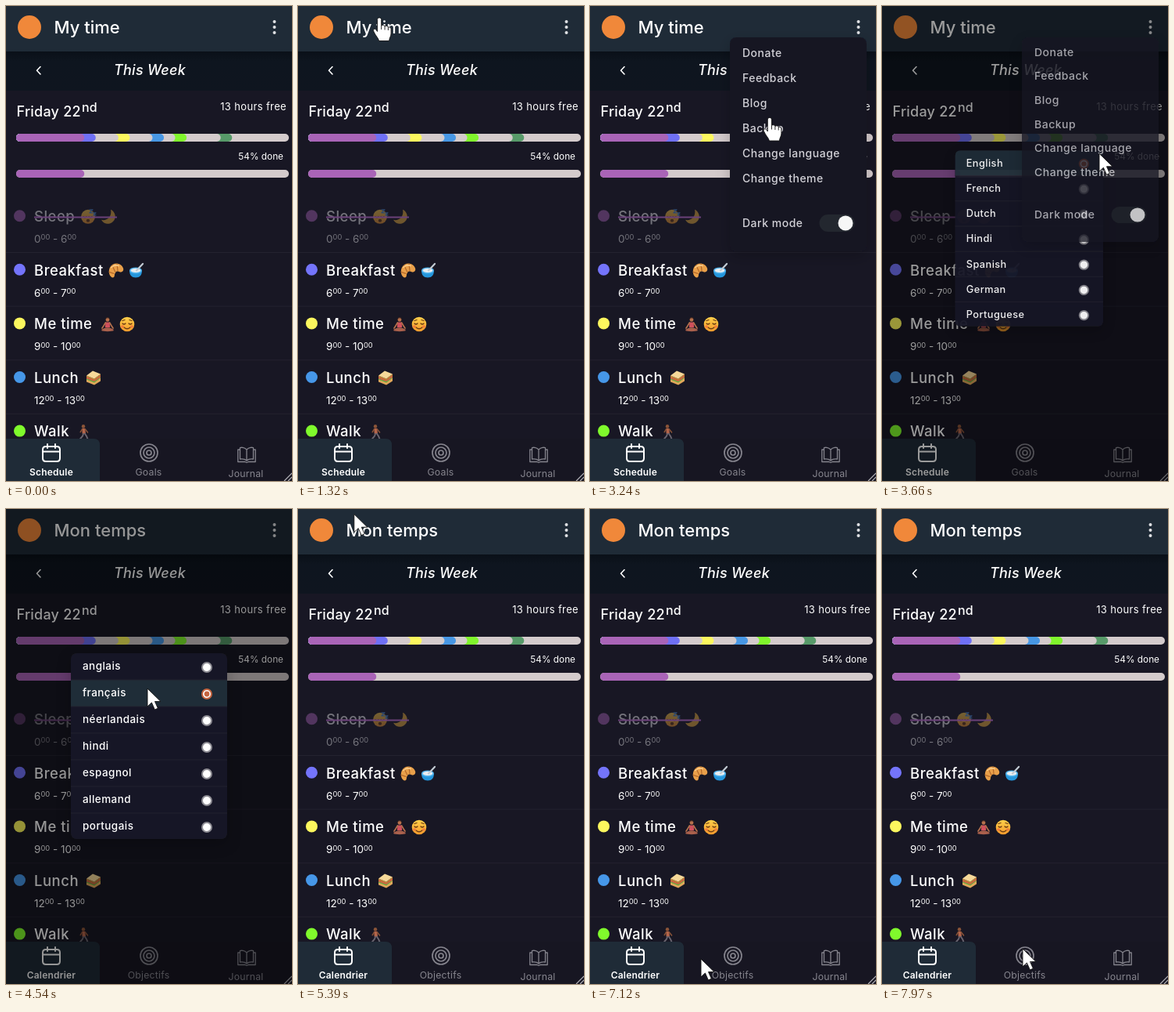
These frames come from a looping animation (366 px wide and 606 px high, 8 s). An HTML page:

```html
<!DOCTYPE html>
<html lang="en">
<head>
<meta charset="utf-8">
<title>My time</title>
<style>
html, body { margin: 0; width: 100%; height: 100%; overflow: hidden; background: #181724; }
svg { display: block; width: 100%; height: 100%; font-family: Inter, "Open Sans", sans-serif; }
text { fill: #fff; }
.name { font-size: 18.5px; font-weight: 500; letter-spacing: .5px; }
.hours { font-size: 13.5px; }
.sup { font-size: 9.3px; }
.tab { font-size: 12.3px; letter-spacing: .2px; text-anchor: middle; }
.tab.on { font-size: 12px; font-weight: 600; }
.off { fill: #85848d; }
.line { fill: none; stroke-linecap: round; stroke-linejoin: round; }
.menu text { font-size: 14px; font-weight: 500; letter-spacing: .5px; fill: #d2d1d7; }
.modal text { font-size: 13.5px; font-weight: 500; letter-spacing: .45px; }
</style>
</head>
<body>
<svg id="stage" viewBox="0 0 366 606" xmlns="http://www.w3.org/2000/svg">
  <defs>
    <filter id="shade" x="-30%" y="-30%" width="160%" height="160%">
      <feDropShadow dx="0" dy="6" stdDeviation="9" flood-color="#000" flood-opacity=".22"/>
    </filter>
    <linearGradient id="sub" x1="0" y1="0" x2="0" y2="1">
      <stop offset="0" stop-color="#0a1018"/><stop offset=".25" stop-color="#0e151f"/><stop offset="1" stop-color="#0f151f"/>
    </linearGradient>
    <linearGradient id="skin" x1="0" y1="0" x2="0" y2="1">
      <stop offset="0" stop-color="#ffd04a"/><stop offset="1" stop-color="#f59a2c"/>
    </linearGradient>
    <clipPath id="round"><rect x="83" y="184" width="200" height="237" rx="7"/></clipPath>

    <g id="doze">
      <circle r="9" fill="url(#skin)"/>
      <path class="line" d="M-6 0q2 2 4 0M1 0q2 2 4 0" stroke="#6b3d14" stroke-width="1.4"/>
      <ellipse cy="5" rx="2.2" ry="2" fill="#6b3d14"/>
      <path class="line" d="M2-9h4l-4 4h4M7-5h3l-3 3h3" stroke="#4a8fe0" stroke-width="1.3"/>
    </g>
    <path id="moon" d="M3-9A9.4 9.4 0 1 1-9 4C-2 6 5 0 3-9Z" fill="#f2b63c"/>
    <g id="croissant">
      <path d="M9-3C6-10-4-11-8-4C-11 2-8 9-4 9C-1 8-3 5-1 3C0 0 3 1 5 2C8 2 10 0 9-3Z" fill="#e9a04a"/>
      <path class="line" d="M1-8L2 0M-5-6L-1 2M-9 2L-3 4" stroke="#b3682a" stroke-width="1.2"/>
      <path class="line" d="M-6-4q4-4 9-2" stroke="#ffd592" stroke-width="1.4"/>
    </g>
    <g id="bowl">
      <path d="M-9 0H7C7 6 4 9-1 9S-9 6-9 0Z" fill="#2496dc"/>
      <ellipse cx="-1" rx="8" ry="4" fill="#53b5ee"/>
      <ellipse cx="-1" rx="6.2" ry="2.6" fill="#e8eef2"/>
      <path class="line" d="M0 0L8-8.5" stroke="#c3ccd4" stroke-width="2.2"/>
    </g>
    <g id="lotus">
      <path d="M-2.8-5C-3-10.5 3-10.5 2.8-5Z" fill="#4a2c22"/>
      <circle cy="-5.5" r="2.3" fill="#b5714d"/>
      <path d="M-2.6-2.5H2.6L3.2 4H-3.2Z" fill="#d0505c"/>
      <path class="line" d="M-2.6-2L-5 2L-7 5M2.6-2L5 2L7 5" stroke="#b5714d" stroke-width="1.7"/>
      <path d="M-8 8C-5 3 5 3 8 8C6 9.5-6 9.5-8 8Z" fill="#a9604c"/>
    </g>
    <g id="calm">
      <circle r="9.3" fill="url(#skin)"/>
      <path class="line" d="M-6-1q2 2 4 0M2-1q2 2 4 0M-6-4.5l3-1M6-4.5l-3-1M-4 4q4 3.5 8 0" stroke="#6b3d14" stroke-width="1.3"/>
      <circle cx="-6" cy="3" r="1.8" fill="#f27a3c"/><circle cx="6" cy="3" r="1.8" fill="#f27a3c"/>
    </g>
    <g id="sandwich">
      <path d="M-9 1L1 5L9-1V4L1 9L-9 5Z" fill="#e0a75a"/>
      <path d="M-9-1L1 3L9-3V0L1 6L-9 2Z" fill="#5fae3c"/>
      <path d="M-9-1L1 3L9-3V-1L1 4.5L-9 .6Z" fill="#e2574a"/>
      <path d="M-9-3L1 1L9-5V-3L1 3L-9-1Z" fill="#c98638"/>
      <path d="M-9-3L-1-9L9-5L1 1Z" fill="#f6d999"/>
    </g>
    <g id="walker">
      <circle cx="-1" cy="-7" r="2.2" fill="#8a5438"/>
      <path d="M-2.6-4.4H1.2L2 2.5H-2.4Z" fill="#b5654a"/>
      <path class="line" d="M-2.4-3.5L-4.8 .5M1.2-3.5L4.6 .8" stroke="#8a5438" stroke-width="1.5"/>
      <path class="line" d="M-1 2.5L-2 5.5L-5 9M1 2.5L3 5.5L4.4 9" stroke="#6a6570" stroke-width="1.9"/>
    </g>
  </defs>

  <rect width="366" height="606" fill="#181724"/>
  <rect y="58" width="366" height="50" fill="url(#sub)"/>
  <rect width="366" height="58" fill="#1f2b37"/>
  <circle cx="30" cy="27" r="15" fill="#f0883a"/>
  <text id="title" x="61.5" y="35" font-size="22" font-weight="500"></text>
  <g fill="#dfe1e4"><circle cx="343.5" cy="20" r="2"/><circle cx="343.5" cy="27" r="2"/><circle cx="343.5" cy="34" r="2"/></g>
  <path class="line" d="M44 77.5L39.5 82.2L44 87" stroke="#fff" stroke-width="1.6"/>
  <text x="184" y="88" font-size="18" font-weight="500" font-style="italic" letter-spacing=".25" text-anchor="middle">This Week</text>
  <text x="13.5" y="141" font-size="18" font-weight="500" letter-spacing=".25">Friday 22</text>
  <text x="97" y="135" font-size="16" font-weight="500">nd</text>
  <text x="359" y="133" font-size="13" letter-spacing=".35" text-anchor="end">13 hours free</text>
  <text x="355" y="196" font-size="11.8" text-anchor="end">54% done</text>
  <g id="bars"></g>
  <g id="list"></g>
  <g id="tabs">
    <rect y="552" width="366" height="54" fill="#171622"/>
    <path d="M0 552H112Q120 552 120 560V606H0Z" fill="#1f2b37"/>
    <path class="line" d="M51 562H65Q69 562 69 566V577Q69 581 65 581H51Q47 581 47 577V566Q47 562 51 562ZM47 568.5H69M53 559V564M63 559V564" stroke="#fff" stroke-width="2"/>
    <g class="line" stroke="#85848d" stroke-width="1.7"><circle cx="183" cy="570" r="11"/><circle cx="183" cy="570" r="7"/><circle cx="183" cy="570" r="3"/></g>
    <path class="line" d="M308 566C305 563 301 563 299.5 563.5V578C303 577.5 306 578 308 580C310 578 313 577.5 316.5 578V563.5C315 563 311 563 308 566V580M299 566H296.8V581.5H306L308 582.5L310 581.5H319.2V566H317" stroke="#85848d" stroke-width="1.3"/>
    <text id="tab0" class="tab on" x="58" y="599"></text>
    <text id="tab1" class="tab off" x="182.5" y="599"></text>
    <text class="tab off" x="307" y="601">Journal</text>
    <path d="M366 596L356 606M366 601L361 606" stroke="#b5b4ba" stroke-width="1.2"/>
  </g>

  <rect id="mask" width="366" height="606" fill="#000"/>
  <g id="modal" class="modal">
    <rect x="83" y="184" width="200" height="237" rx="7" fill="#191825" filter="url(#shade)"/>
    <rect id="pick" x="83" width="200" height="34" fill="#1f2d38" clip-path="url(#round)"/>
    <g id="langs"></g>
  </g>
  <g id="menu" class="menu">
    <rect x="179" y="40" width="175" height="273" rx="8" fill="#181724" filter="url(#shade)"/>
    <g id="items"></g>
    <rect x="293.5" y="266" width="45" height="22" rx="11" fill="#23272f"/>
    <circle cx="327" cy="277" r="9.5" fill="#f6f6f6"/>
  </g>
  <g id="cursor" fill="#fff" stroke="#111" stroke-width=".9" stroke-linejoin="round">
    <path id="arrow" d="M0 0V23L5.4 18L9.4 27L13.4 25.2L9.5 16.6H17Z"/>
    <g id="hand">
      <path d="M-2.6 2.5C-2.6-1 2.6-1 2.6 2.5V10C4 8.6 6.5 9 7 11C8.5 9.7 11 10.3 11.3 12.2C13 11.3 15 12.3 15 14.5V20C15 23.5 13 25 12.5 29.5H-.5C-1 26-5 23-7.5 17C-8.5 14.5-5.5 13.2-4 15.5L-2.6 17.5Z"/>
      <path d="M2.6 10V15M7 11V15.5M11.3 12.2V16" fill="none"/>
    </g>
  </g>
</svg>
<script>
const $ = id => document.getElementById(id);
const LOOP = 8000;
const MENU_OPEN = 2432, MODAL_OPEN = 3513, PICK = 4440, MODAL_CLOSE = 4530, CLOSE_MS = 125;

const words = [
  { title: 'My time', tabs: ['Schedule', 'Goals'],
    langs: ['English', 'French', 'Dutch', 'Hindi', 'Spanish', 'German', 'Portuguese'] },
  { title: 'Mon temps', tabs: ['Calendrier', 'Objectifs'],
    langs: ['anglais', 'français', 'néerlandais', 'hindi', 'espagnol', 'allemand', 'portugais'] }
];

// Each pill spans from the left edge, so later hours are painted first.
const pill = (y, hours, fill) =>
  `<rect x="13" y="${y}" width="${349 * hours / 24}" height="10" rx="5" fill="${fill}"/>`;
const grey = '#d4cbcc', purple = '#a964b7';
const day = [[6, purple], [7, '#6f70f5'], [9, grey], [10, '#fcf75e'], [12, grey], [13, '#4797e4'],
  [14, grey], [15, '#80f52c'], [18, grey], [19, '#579a69'], [24, grey]];
$('bars').innerHTML = day.reverse().map(([end, c]) => pill(163, end, c)).join('')
  + pill(209, 24, grey) + pill(209, 6, purple);

const rows = [
  ['Sleep', '#a964b7', 0, 6, [['doze', 105], ['moon', 131]]],
  ['Breakfast', '#7474fb', 6, 7, [['croissant', 141], ['bowl', 167]]],
  ['Me time', '#fcf75e', 9, 10, [['lotus', 130], ['calm', 155]]],
  ['Lunch', '#4697e8', 12, 13, [['sandwich', 112]]],
  ['Walk', '#80fa2c', 14, 15, [['walker', 100]]]
];
const hour = n => `${n}<tspan class="sup" dy="-3.6">00</tspan>`;
$('list').innerHTML = rows.map(([name, color, from, to, icons], i) => {
  const y = 268 + i * 68.6;
  const done = i === 0;
  return `<g opacity="${done ? .4 : 1}"><circle cx="17.5" cy="${y - .3}" r="7.5" fill="${color}"/>
    <text class="name" x="36" y="${y + 7}">${name}</text>
    ${icons.map(([id, x]) => `<use href="#${id}" x="${x}" y="${y + .8}"/>`).join('')}
    <text class="hours" x="36" y="${y + 34}">${hour(from)}<tspan dy="3.6"> - </tspan>${hour(to)}</text></g>
    ${done ? `<path d="M36 269.5H142" stroke="#6a4179" stroke-width="2"/>` : ''}
    <path d="M0 ${y + 46.5}H366" stroke="#23222f"/>`;
}).join('');

$('items').innerHTML = ['Donate', 'Feedback', 'Blog', 'Backup', 'Change language', 'Change theme']
  .map((s, i) => `<text x="195" y="${65 + i * 32}">${s}</text>`).join('')
  + '<text x="195" y="282">Dark mode</text>';

function setWords(n) {
  const w = words[n];
  $('title').textContent = w.title;
  w.tabs.forEach((s, i) => $('tab' + i).textContent = s);
  $('pick').setAttribute('y', 184 + n * 34);
  $('langs').innerHTML = w.langs.map((s, i) => {
    const y = 201 + i * 34, on = i === n;
    return `<text x="98" y="${y + 4.5}">${s}</text>
      <circle cx="257" cy="${y + 1}" r="6" fill="#fff" stroke="${on ? '#c5643f' : '#8d8c93'}" stroke-width="2"/>
      ${on ? `<circle cx="257" cy="${y + 1}" r="3.4" fill="#c5643f"/>` : ''}
      ${i ? `<path d="M83 ${y - 17}H283" stroke="#23222f"/>` : ''}`;
  }).join('');
}

// Pointer path: time, x, y
const path = [
  [130, 330, 604], [200, 322, 540], [280, 335, 420], [370, 368, 312],
  [590, 368, 112], [760, 270, 85], [960, 110, 32], [1120, 58, 8], [1320, 104, 15], [1400, 102, 18],
  [1540, 73, 13], [1760, 180, 42], [2000, 305, 46], [2180, 343, 28], [2290, 348, 8], [2420, 344, 32],
  [2520, 344, 32], [2760, 300, 66], [3040, 235, 92], [3280, 232, 150], [3490, 278, 187], [3720, 278, 188],
  [3900, 262, 193], [4180, 205, 212], [4390, 181, 229], [4690, 181, 229],
  [4860, 262, 165], [5100, 180, 45], [5280, 54, 12], [5500, 105, 10], [5700, 150, 70], [6000, 234, 240],
  [6300, 229, 388], [6480, 224, 534], [6640, 195, 572], [6860, 27, 574], [7120, 142, 574],
  [7400, 142, 574], [7680, 308, 574], [7970, 180, 561], [8000, 180, 561]
];

function pointer(t) {
  const i = path.findIndex(p => p[0] > t) - 1;
  if (i < 0) return null;
  const a = path[i], b = path[i + 1];
  const p = path[i - 1] || a, n = path[i + 2] || b;
  const span = b[0] - a[0], u = (t - a[0]) / span;
  const slope = (l, r, k) => r === l ? 0 : (r[k] - l[k]) / (r[0] - l[0]) * span;
  return [1, 2].map(k => {
    if (a[k] === b[k]) return a[k];
    const m0 = slope(p, b, k) * .7, m1 = slope(a, n, k) * .7;
    return (1 + 2 * u) * (1 - u) ** 2 * a[k] + u * (1 - u) ** 2 * m0
      + u * u * (3 - 2 * u) * b[k] + u * u * (u - 1) * m1;
  });
}

const ramp = (t, from, ms) => Math.min(1, Math.max(0, (t - from) / ms));
const easeOut = (u, p) => 1 - (1 - u) ** p;
const show = (el, on) => el.style.display = on ? '' : 'none';
const within = (x, y, l, t, r, b) => x >= l && x <= r && y >= t && y <= b;

function clickable(t, x, y) {
  if (t >= MODAL_OPEN && t < MODAL_CLOSE + CLOSE_MS) return false;
  if (t > MENU_OPEN && t < MODAL_OPEN && within(x, y, 179, 44, 354, 236)) return true;
  return within(x, y, 12, 8, 180, 46) || within(x, y, 330, 8, 360, 50)
    || within(x, y, 28, 66, 56, 98) || within(x, y, 0, 246, 366, 551);
}

let lang = -1;
function draw(t) {
  const next = t >= PICK ? 1 : 0;
  if (next !== lang) setWords(lang = next);

  const menu = easeOut(ramp(t, MENU_OPEN, 200), 5) - ramp(t, MODAL_OPEN, 200) ** 5;
  show($('menu'), menu > 0);
  $('menu').setAttribute('opacity', menu);
  $('menu').setAttribute('transform', `translate(0 40) scale(1 ${.8 + .2 * menu}) translate(0 -40)`);

  const opened = ramp(t, MODAL_OPEN, 300), closed = ramp(t, MODAL_CLOSE, CLOSE_MS);
  const modal = easeOut(opened, 4) - closed ** 4;
  const scale = .2 + .8 * modal;
  show($('modal'), modal > 0);
  $('modal').setAttribute('opacity', modal);
  $('modal').setAttribute('transform', `translate(283 190) scale(${scale}) translate(-283 -190)`);
  $('mask').setAttribute('opacity', .45 * (easeOut(opened, 3) - closed));

  const pos = pointer(t);
  show($('cursor'), pos);
  if (pos) {
    const hand = clickable(t, ...pos);
    $('cursor').setAttribute('transform', `translate(${pos[0].toFixed(1)} ${pos[1].toFixed(1)})`);
    show($('hand'), hand);
    show($('arrow'), !hand);
  }
}

const start = performance.now();
function tick() {
  draw((performance.now() - start) % LOOP);
  requestAnimationFrame(tick);
}
tick();
</script>
</body>
</html>
```
